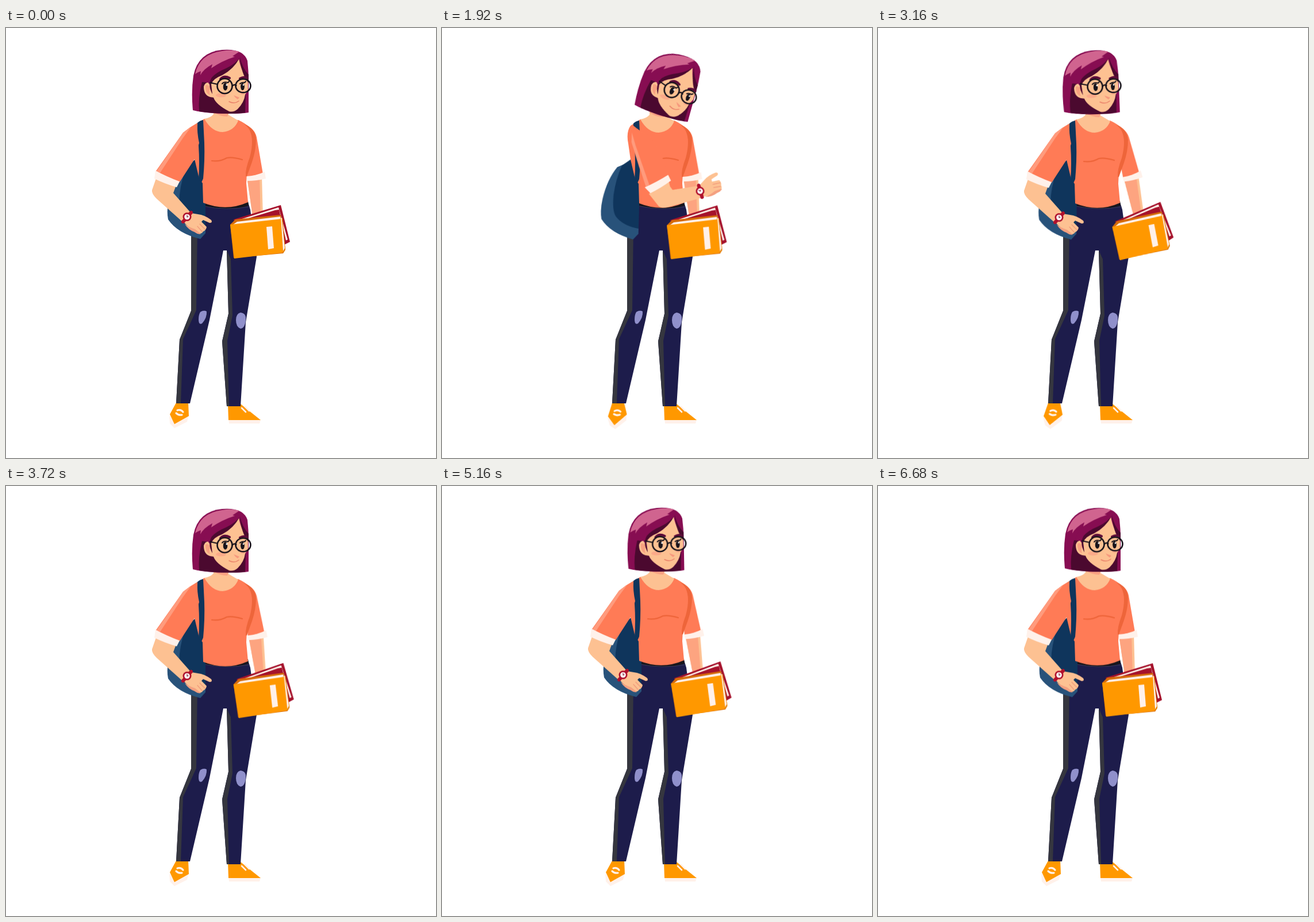
Write an HTML page that moves like this. It is 748x748 px and loops after 6.8 s.

```html
<!DOCTYPE html>
<html lang="en">
<head>
<meta charset="utf-8">
<title>Student checking her watch</title>
<style>
html, body { margin: 0; width: 100%; height: 100%; overflow: hidden; background: #fff; }
svg { display: block; width: 100%; height: 100%; }

:root { --sine: cubic-bezier(.37, 0, .63, 1); }
.skin { fill: #fdc192; }
.shirt { fill: #ff7b56; }
.shade { fill: #ee653a; }
.cuff { fill: #fff1ea; }
.navy { fill: #1d1c4b; }
.side { fill: #35363f; }
.patch { fill: #9090cb; }
.bag { fill: #0f355c; }
.orange { fill: #ff9800; }
.red { fill: #a5122c; }
.plum { fill: #4b092f; }
.hair { fill: #870d52; }
.line { fill: none; stroke-linecap: round; stroke-linejoin: round; }

.move { animation: 6.8s var(--sine) infinite; }
.breath { animation: breath .85s var(--sine) infinite alternate; }
.bagSwing { animation-name: bagSwing; transform-origin: 340px 165px; }
.head { animation-name: nod; transform-origin: 378px 177px; }
.face { animation-name: look; transform-origin: 380px 101px; }
.bookArm { animation-name: swing; transform-origin: 425px 185px; }
.arm { animation-name: lift; transform-origin: 335px 168px; }
.forearm { animation-name: bend; transform-origin: 270px 280px; }
.footL { animation-name: turnL; transform-origin: 306px 655px; }
.footR { animation-name: turnR; transform-origin: 390px 660px; }
.open { animation: open 6.8s step-end infinite; }
.closed { animation: closed 6.8s step-end infinite; }

@keyframes breath { to { transform: translateY(6px); } }
@keyframes bagSwing {
  0%, 54%, 100% { transform: none; }
  13% { transform: rotate(.5deg); }
  28% { transform: rotate(1.6deg); }
  40% { transform: rotate(1deg); }
}
@keyframes nod {
  0%, 55%, 68%, 98.2%, 100% { transform: translate(0, 0) rotate(0deg); }
  13.2% { transform: translate(-1px, 2.5px) rotate(13deg); }
  28.2% { transform: translate(-1px, 2.5px) rotate(15.5deg); }
  39.2% { transform: translate(0, 0) rotate(-4deg); }
  79% { transform: translate(0, 0) rotate(-1.2deg); }
}
@keyframes look {
  0%, 39.2%, 100% { transform: rotate(0deg); }
  13.2% { transform: rotate(6deg); }
  28.2% { transform: rotate(7deg); }
}
@keyframes swing {
  0%, 61.8%, 97.5%, 100% { transform: none; }
  14.4% { transform: rotate(-13.7deg); }
  27.6% { transform: rotate(-.4deg); }
  42.6% { transform: rotate(-7deg); }
  80% { transform: rotate(-3.4deg); }
}
@keyframes lift {
  0%, 37.6%, 100% { transform: none; }
  11.2%, 20% { transform: rotate(-51deg); }
  28% { transform: rotate(-52.5deg); }
}
@keyframes bend {
  0%, 37.6%, 100% { transform: translate(0, 0) rotate(0deg); }
  11.2%, 20% { transform: translate(9.7px, 2.4px) rotate(-18deg); }
  28% { transform: translate(-5.5px, 4px) rotate(-5deg); }
}
@keyframes turnL {
  0%, 52.9%, 100% { transform: none; }
  10.6%, 21.8%, 31.8%, 42.4% { transform: rotate(-14deg); }
  27.5% { transform: rotate(-11deg); }
}
@keyframes turnR {
  0%, 5%, 22%, 100% { transform: none; }
  13% { transform: rotate(-4deg); }
}
@keyframes open { 0%, 24.2% { opacity: 1; } 6.2% { opacity: 0; } 100% { opacity: 1; } }
@keyframes closed { 0%, 24.2% { opacity: 0; } 6.2% { opacity: 1; } 100% { opacity: 0; } }
</style>
</head>
<body>
<svg viewBox="0 0 748 748" aria-label="Student with books and a shoulder bag">

  <!-- shoes -->
  <g class="move footL">
    <path class="cuff" d="M284 673L293 687 317 676 315 685 293 696 285 688Z"/>
    <path class="orange" d="M297 650H317L318 675 293 689 285 672Z"/>
    <path class="line" stroke="#fff1ea" stroke-width="3.2" d="M298 665q6-2 10 3M296 670q4 4 10 3"/>
  </g>
  <g class="move footR">
    <path class="cuff" d="M387 680L443 682 441 688H388Z"/>
    <path class="orange" d="M386 654H408L443 682H387Z"/>
    <path class="line" stroke="#fff1ea" stroke-width="2.6" d="M410 661L417 668M416 659L423 666"/>
  </g>

  <!-- trousers -->
  <path class="navy" d="M343 303Q384 315 421 303L425 316 436 398 417 512 408 658H384L376 545 387 497 384 387H378L354 508 320 653H296L302 542 322 492V350Z"/>
  <path class="side" d="M322 350H333L331 491 308 541 304 653H296L302 542 322 492ZM384 387L391 402 394 500 385 544 388 658H384L376 545 387 497Z"/>
  <path class="patch" d="M338 494Q344 490 349 493Q350 504 341 514Q335 517 335 507Q335 499 338 494Z"/>
  <path class="patch" d="M408 495Q418 496 417 507Q416 522 408 523Q400 520 400 508Q400 497 408 495Z"/>
  <path fill="#16151c" d="M343 302Q384 316 421 301L422 309Q384 320 343 309Z"/>
  <path class="line" stroke="#3a3a58" d="M344 310Q384 318 423 311"/>

  <!-- bag -->
  <g class="breath"><g class="move bagSwing">
    <path fill="#28527a" d="M329 232L307 242Q290 264 283 298Q279 318 282 333Q298 357 338 367L347 357V270Z"/>
    <path class="bag" d="M330 228L315 239Q305 263 302 290Q300 318 307 328Q320 344 347 348V270Z"/>
  </g></g>

  <!-- arm with books -->
  <g class="breath"><g class="move bookArm">
    <path class="skin" d="M419 258L445 256 447 330 430 334Z"/>
    <path fill="#fda480" d="M419 258L441 256 443 330 430 334Z"/>
    <path class="shirt" d="M412 170Q432 172 436 190L447 254 418 259Z"/>
    <path class="cuff" d="M417 258Q436 257 450 250L452 262Q436 266 419 266Z"/>
    <path class="red" d="M396 333L478 308 494 372 484 377 400 345Z"/>
    <path class="cuff" d="M401 335L474 312 490 368 482 372Z"/>
    <path class="red" d="M415 333L468 317 475 316 488 374 478 376Z"/>
    <path fill="#d66b09" d="M390 342L399 333 478 325 486 385 482 392 396 400Z"/>
    <path class="cuff" d="M395 342L402 337 477 328 484 384 480 387Z"/>
    <path class="orange" d="M390 342L480 332 485 384 481 391 397 401Z"/>
    <path fill="#e58106" d="M478 329L481 331 486 386 482 392Z"/>
    <path class="cuff" d="M478 330L479.500 330 485 383 482 388Z"/>
    <path class="cuff" d="M453 346L463 345 466 383 456 385Z"/>
  </g></g>

  <g class="breath">
    <!-- torso and neck -->
    <path class="shirt" d="M345 158L328 169Q320 180 324 200L328 228 336 262 342 270 343 304Q383 320 421 303L418 270Q418 248 427 225L434 190Q430 172 404 160Z"/>
    <path class="shade" d="M414 167Q434 174 435 194Q435 212 428 233L419 258H417Q416 246 424 225Q432 195 424 178Q420 171 414 167Z"/>
    <path class="line" stroke="#ee653a" stroke-width="2.2" d="M358 231Q372 233 384 226Q394 224 411 229"/>
    <path class="skin" d="M361 125V150Q356 156 345 158Q358 181 377 181Q397 179 404 161L387 151V130Z"/>
    <path fill="#f9a283" d="M361 146Q374 148 387 149L385 154Q372 154 361 146Z"/>
    <path class="bag" d="M333 165Q337 161 343 160Q344 180 345 200Q346 230 343 262L338 273 335 262Q337 235 335 205Q331 185 333 165Z"/>

    <!-- head -->
    <g class="move head">
      <path class="hair" d="M325 143Q322 110 326 83Q334 42 376 38Q413 35 420 57Q422 75 422 92V147Q410 149 389 149Q350 149 325 143Z"/>
      <path class="plum" d="M341 94Q334 122 336 145Q360 149 389 149Q408 149 417 147V112L395 122 360 96Z"/>
      <path class="skin" d="M405 54Q394 72 376 82Q360 88 357 96Q347 92 344 102Q344 117 355 120L361 121Q365 133 388 145Q396 147 403 141Q414 130 416 116L421 107V89Q410 78 405 54Z"/>
      <path fill="#f7a181" d="M347 100Q353 97 356 106Q352 107 355 117Q346 113 347 100Z"/>
      <path class="hair" d="M407 51Q396 69 375 79Q358 85 356 101L350 93 342 94Q350 68 378 58Z"/>
      <path class="plum" d="M407 51Q396 72 376 82Q360 88 357 98L359 115Q350 99 358 86Q366 77 383 70Q400 62 407 51ZM407 51Q411 70 422 81V96Q409 80 407 51Z"/>
      <path fill="#d0648f" d="M329 80Q337 45 376 40Q393 37 406 41L394 49 398 50Q376 57 357 70L359 63Q344 71 338 82L339 75Q333 77 329 80Z"/>
      <path class="hair" d="M417 115L422 110V147H416Z"/>
      <g class="move face">
        <ellipse cx="374" cy="117" rx="9" ry="3.500" fill="#fbaa89"/>
        <ellipse cx="412" cy="113" rx="5" ry="3" fill="#fbaa89"/>
        <path class="line" stroke="#5c0b38" stroke-width="4" d="M373 89Q379 82 389 87M407 88Q413 84 419 87"/>
        <ellipse cx="381.500" cy="102" rx="3.800" ry="6.800" fill="#17131b"/>
        <ellipse cx="411.500" cy="102" rx="3.400" ry="6.300" fill="#17131b"/>
        <path class="line" stroke="#17131b" stroke-width="2" d="M376 97Q379 93 386 95L388 93M407 97Q410 94 415 95L417 93"/>
        <circle cx="384" cy="99" r="1.500" fill="#fff"/>
        <circle cx="413" cy="99" r="1.300" fill="#fff"/>
        <path class="line" stroke="#17131b" stroke-width="2.300" d="M355 95L368 98M393.500 101Q397 97 400.500 100"/>
        <circle class="line" cx="380.500" cy="101" r="13" stroke="#17131b" stroke-width="2.600"/>
        <ellipse class="line" cx="412.500" cy="100.500" rx="13" ry="11.800" stroke="#17131b" stroke-width="2.600"/>
        <path fill="#f6977c" d="M396 117L406 121 403 124Q398 121 396 117Z"/>
        <path class="line" stroke="#e98069" stroke-width="1.500" d="M388 128Q397 133 405 127"/>
      </g>
    </g>

    <!-- arm with watch -->
    <g class="move arm">
      <g class="move forearm">
        <path class="skin" d="M263 256L254 282Q253 288 262 297L308 338 322 322 291 287 298 268Z"/>
        <g class="open">
          <path class="skin" d="M309 337L322 322 334 324Q345 325 357 334Q360 339 354 339L343 334 340 337 349 346Q348 352 343 354Q340 359 334 357L329 352Q318 349 309 337Z"/>
          <path fill="#f4a080" d="M311 341Q319 347 329 350L339 358Q335 360 328 355 317 351 311 341Z"/>
          <path class="line" stroke="#f19b7c" stroke-width="1.400" d="M333 345L341 354M337 341L346 350"/>
        </g>
        <g class="closed" transform="translate(270 280) rotate(69) translate(-389 -289)">
          <path class="skin" d="M450 256L454 244Q461 237 470 236L481 238Q485 241 483 244Q488 247 486 251Q486 256 478 258L472 267Q463 272 454 271Z"/>
          <path class="line" stroke="#f19b7c" stroke-width="1.400" d="M472 243L483 244M473 249L485 250M468 255L477 257"/>
        </g>
        <path class="line" stroke="#b0112d" stroke-width="6" stroke-linecap="butt" d="M308 337L322 321"/>
        <circle cx="315" cy="328.500" r="7.500" fill="#b0112d"/>
        <circle cx="315" cy="328.500" r="4.800" fill="#fff"/>
        <path class="line" stroke="#872033" stroke-width="1.200" d="M315 325.500V329L317 328"/>
      </g>
      <path class="skin" d="M262 258L296 272 288 282 264 270Z"/>
      <path class="shirt" d="M333 165Q320 172 308 182L260 250 302 268 328 228 336 200Q332 182 333 165Z"/>
      <path fill="#ff9b7d" d="M322 172L308 182 262 249 268 252 308 191Z"/>
      <path class="cuff" d="M260 248Q280 259 302 267L297 277Q276 271 258 262Z"/>
    </g>
  </g>
</svg>
</body>
</html>
```
